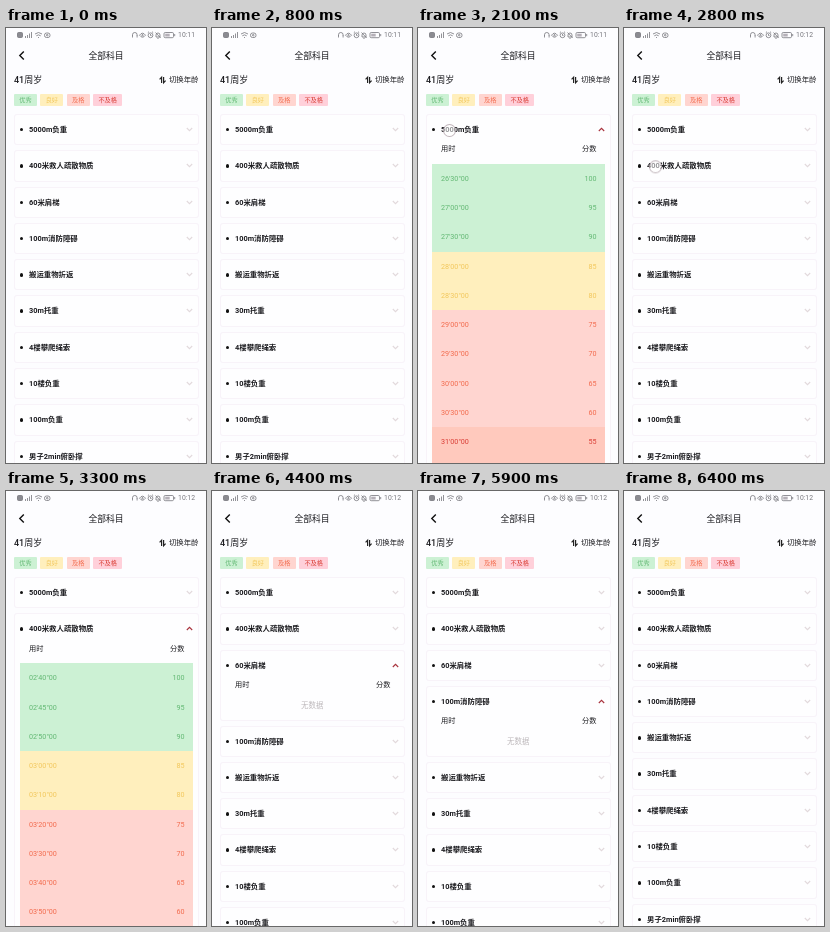
Animation of 200 by 435 pixels, one loop 6500 ms. Source, as an HTML page:

```html
<!DOCTYPE html>
<html lang="zh-CN">
<head>
<meta charset="utf-8">
<title>全部科目</title>
<style>
* { box-sizing: border-box; }
html, body { margin: 0; width: 100%; height: 100%; overflow: hidden; background: #fdfdff; }
body {
  position: relative; color: #1c1c20; white-space: nowrap;
  font: 7.4px/10px Roboto, "Noto Sans CJK SC", "Noto Sans CJK", sans-serif;
}
.stage { position: absolute; left: 0; top: 0; width: 200px; height: 435px; overflow: hidden; }
.stage > * { position: absolute; }
.art { left: 0; top: 0; }
.clock { right: 11px; top: 2px; font-size: 6.8px; color: #77777d; }
.clock span { animation: minute 6.5s step-end infinite; }
.clock .next { position: absolute; right: 0; opacity: 0; animation-name: nextMinute; }
.title { left: 0; width: 100%; top: 23px; text-align: center; font-size: 8.8px; font-weight: 500; }
.age { left: 8px; top: 47px; font-size: 9px; font-weight: 500; }
.switch { right: 7.5px; top: 47px; }
.tags { left: 8px; top: 66px; display: flex; gap: 3.4px; }
.tag { height: 12px; padding: 0 5.3px; font-size: 6.2px; line-height: 12px; border-radius: 1px; }

.good { --ink: #62b873; --fill: #ccf1d4; }
.fair { --ink: #f2c75c; --fill: #ffefbd; }
.pass { --ink: #f26a4c; --fill: #ffd5d0; }
.fail { --ink: #d93c34; --fill: #ffc9bd; }
.tag, .row { color: var(--ink); background: var(--fill); }
.tag.fail { --fill: #ffd0da; font-weight: 500; }

.list { left: 8px; top: 86px; width: 184.5px; }
.card { margin-bottom: 5px; background: #fefeff; border-radius: 3px; box-shadow: inset 0 0 0 1px #f8f3f9; }
.head { position: relative; height: 31.3px; padding-left: 15px; line-height: 31.3px; font-weight: 600; }
.head::before {
  content: ""; position: absolute; left: 5.8px; top: 14px;
  width: 3.4px; height: 3.4px; border-radius: 50%; background: #111;
}
.chev {
  position: absolute; left: 172px; top: 13px; width: 7px; height: 5px;
  fill: none; stroke: #e2d9dc; stroke-width: 1.1;
}
.panel { height: 0; overflow: hidden; font-size: 7.2px; }
.cols, .row { display: flex; justify-content: space-between; }
.cols { height: 18.7px; padding: 0 14px 0 15px; line-height: 8.6px; }
.row { height: 29.25px; margin: 0 5.5px 0 6px; padding: 0 8.5px 0 9px; line-height: 29.25px; }
.none { text-align: center; line-height: 11px; font-size: 7.5px; color: #bdb8bb; }

.panel, .chev { animation: 6.5s ease-in-out infinite; }
.c1 .panel { animation-name: open1; }
.c2 .panel { animation-name: open2; }
.c3 .panel { animation-name: open3; }
.c4 .panel { animation-name: open4; }
.c1 .chev { animation-name: flip1; }
.c2 .chev { animation-name: flip2; }
.c3 .chev { animation-name: flip3; }
.c4 .chev { animation-name: flip4; }

@keyframes open1 { 0%, 20%, 38.4%, 100% { height: 0; } 24.5%, 33.8% { height: var(--h); } }
@keyframes open2 { 0%, 44.6%, 60.8%, 100% { height: 0; } 49.2%, 55.4% { height: var(--h); } }
@keyframes open3 { 0%, 63.4%, 78.5%, 100% { height: 0; } 67.4%, 73.1% { height: var(--h); } }
@keyframes open4 { 0%, 84.6%, 93.8%, 98.3%, 100% { height: 0; } 89.5%, 93.8% { height: var(--h); } 98.3% { height: 0; } }

@keyframes flip1 {
  0%, 20%, 38.4%, 100% { transform: none; stroke: #e2d9dc; opacity: 1; }
  24.5% { transform: rotate(180deg); stroke: #a8323c; opacity: 0; }
  27.5%, 33.8% { transform: rotate(180deg); stroke: #a8323c; opacity: 1; }
}
@keyframes flip2 {
  0%, 44.6%, 60.8%, 100% { transform: none; stroke: #e2d9dc; }
  49.2%, 55.4% { transform: rotate(180deg); stroke: #a8323c; }
}
@keyframes flip3 {
  0%, 63.4%, 78.5%, 100% { transform: none; stroke: #e2d9dc; }
  67.4%, 73.1% { transform: rotate(180deg); stroke: #a8323c; }
}
@keyframes flip4 {
  0%, 84.6%, 98.3%, 100% { transform: none; stroke: #e2d9dc; }
  89.5%, 93.8% { transform: rotate(180deg); stroke: #a8323c; }
}

.touch {
  left: 25px; top: 95.5px; width: 13px; height: 13px; border-radius: 50%;
  background: rgba(255, 255, 255, .55); border: 1px solid rgba(150, 130, 140, .6);
  opacity: 0; animation: tap 6.5s step-end infinite;
}
@keyframes tap {
  0% { opacity: 0; transform: none; }
  18.4% { opacity: 1; }
  21.4% { opacity: 0; }
  32.2% { opacity: 1; transform: none; }
  35.3% { opacity: 0; }
  41.5% { opacity: 1; transform: translateY(36.3px); }
  44.6% { opacity: 0; }
  52.3% { opacity: 1; transform: translateY(36.3px); }
  55.3% { opacity: 0; }
  61.5% { opacity: 1; transform: translateY(72.6px); }
  64.5% { opacity: 0; }
  70.7% { opacity: 1; transform: translateY(72.6px); }
  73.8% { opacity: 0; }
  81.5% { opacity: 1; transform: translateY(108.9px); }
  84.6% { opacity: 0; }
  92.2% { opacity: 1; transform: translateY(108.9px); }
  95.3%, 100% { opacity: 0; }
}
@keyframes minute { 0% { opacity: 1; } 41.5%, 100% { opacity: 0; } }
@keyframes nextMinute { 0% { opacity: 0; } 41.5%, 100% { opacity: 1; } }
</style>
</head>
<body>
<div class="stage">
  <svg class="art" width="200" height="64" fill="none" stroke="#77777d" stroke-width=".8">
    <rect x="11.5" y="4.5" width="5" height="5" rx="1" fill="#8b8b91"/>
    <path d="M19.5 10V8M21.5 10V7M23.5 10V5.5M25.5 10V4"/>
    <path d="M29 6q3.5-3 7 0M30.3 7.8q2.2-1.8 4.4 0M32.5 9v1"/>
    <rect x="38.5" y="5" width="5.5" height="4.5" rx="2"/><circle cx="41.2" cy="7.2" r=".8"/>
    <path d="M126.5 8V6.8a2.3 2.3 0 0 1 4.6 0V8M126.5 7.5v2M131.1 7.5v2"/>
    <path d="M133.5 7.2q3-4 6 0q-3 4-6 0z"/><circle cx="136.5" cy="7.2" r=".7"/>
    <circle cx="144.5" cy="7.3" r="2.4"/><path d="M144.5 6v1.5h1M141.8 4.7l1.2-1M147.2 4.7l-1.2-1"/>
    <path d="M150 9V7a2 2 0 0 1 4 0v2zM151.3 10.3h1.4M149.5 4.5l5.2 5.5"/>
    <rect x="158" y="4.5" width="9.5" height="5.2" rx="1.2"/><path d="M168.7 6v2.2"/>
    <rect x="159.2" y="5.7" width="4.5" height="2.8" fill="#b5b0b8" stroke="none"/>
    <path d="M17.8 23.6l-4 3.9 4 3.9" stroke="#111" stroke-width="1.4"/>
    <g stroke="#222" stroke-width="1.2"><path d="M155.6 55v-5.8l-2 2.2M157.6 49v5.8l2-2.2"/></g>
  </svg>
  <div class="clock"><span class="next">10:12</span><span>10:11</span></div>
  <div class="title">全部科目</div>
  <div class="age">41周岁</div>
  <div class="switch">切换年龄</div>
  <div class="tags">
    <span class="tag good">优秀</span><span class="tag fair">良好</span><span class="tag pass">及格</span><span class="tag fail">不及格</span>
  </div>
  <div class="list"></div>
  <div class="touch"></div>
</div>
<script>
const names = ['5000m负重', '400米救人疏散物质', '60米肩梯', '100m消防障碍', '搬运重物折返',
  '30m托重', '4楼攀爬绳索', '10楼负重', '100m负重', '男子2min俯卧撑'];
const ROW = 29.25, COLS = 18.7;

const pad = n => String(n).padStart(2, '0');
const clock = s => `${pad(Math.floor(s / 60))}'${pad(s % 60)}"00`;
const grade = score => score >= 90 ? 'good' : score >= 80 ? 'fair' : score >= 60 ? 'pass' : 'fail';

// Seconds needed for the i-th score (100, 95, 90, ...)
const tables = [
  i => 1590 + 30 * i,
  i => i < 3 ? 160 + 5 * i : 150 + 10 * i
];

function rows(time, count = 12) {
  return Array.from({ length: count }, (_, i) => {
    const score = 100 - 5 * i;
    return `<div class="row ${grade(score)}"><span>${clock(time(i))}</span><span>${score}</span></div>`;
  }).join('');
}

function panel(i) {
  const time = tables[i];
  const height = time ? COLS + 12 * ROW + 6 : 39.7;
  const body = time ? rows(time) : '<div class="none">无数据</div>';
  return `<div class="panel" style="--h:${height}px">
    <div class="cols"><span>用时</span><span>分数</span></div>${body}</div>`;
}

document.querySelector('.list').innerHTML = names.map((name, i) =>
  `<div class="card c${i + 1}"><div class="head">${name}
    <svg class="chev" viewBox="0 0 7 5"><path d="M.8 1l2.7 2.7L6.2 1"/></svg></div>
    ${i < 4 ? panel(i) : ''}</div>`).join('');
</script>
</body>
</html>
```
